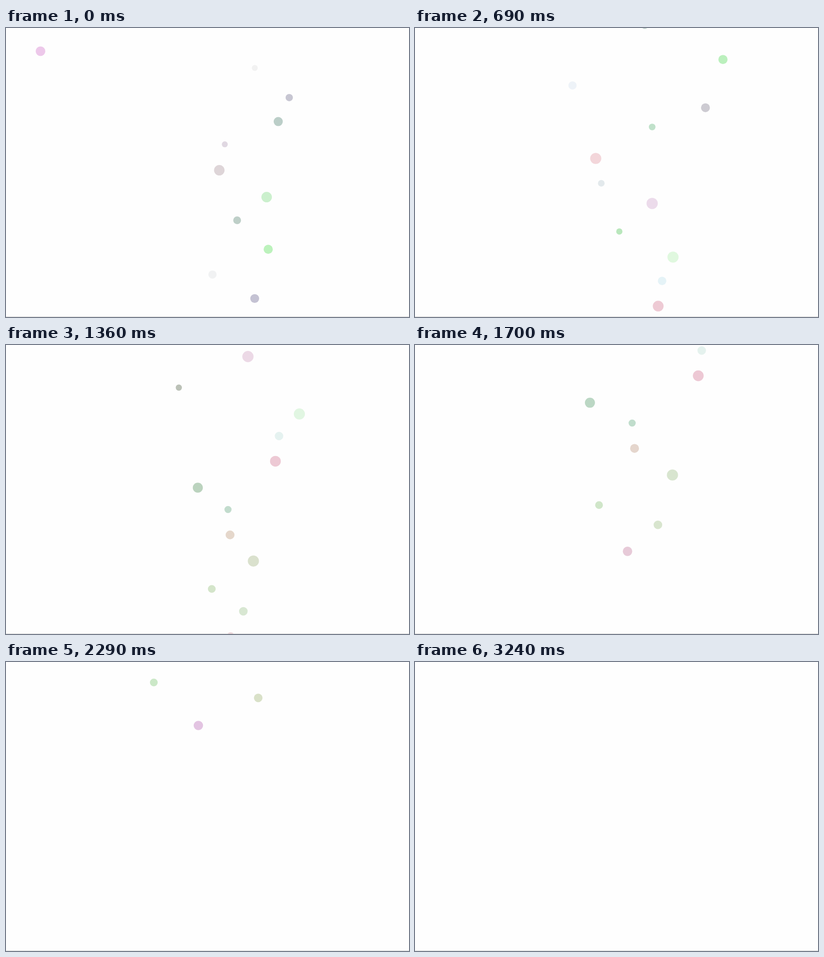
Recreate the animation shown at these times as an HTML page. Size 882 by 635 pixels, loop 3310 ms.

```html
<!DOCTYPE html>
<html lang="en">
<head>
<meta charset="utf-8">
<title>Rising bubbles</title>
<style>
html, body { margin: 0; width: 100%; height: 100%; overflow: hidden; background: #fefefe; }
svg { display: block; width: 882px; height: 635px; }
</style>
</head>
<body>
<svg viewBox="0 0 882 635">
  <g id="bubbles"></g>
  <rect y="634" width="882" height="1" fill="#d2d2d2"/>
</svg>
<script>
const LOOP = 3310;
const ORIGIN = { x: 508.2, y: 760 };
const FIRST = 673.2, GAP = 55.96;

// slope, radius, colour when low, colour when high
const specs = [
  [.054, 6.5, '#f2f2f2'],
  [.184, 8, '#c7c6d2'],
  [.158, 10, '#bfcec7', '#bacec8'],
  [-.0582, 6.5, '#d5d5d2', '#e6daea'],
  [-.0925, 11.5, '#dfd3db', '#ddd6d5'],
  [.1603, 11.5, '#caefca', '#cdf2d0'],
  [-.007, 8.5, '#c0cfc8', '#bacec8'],
  [.24, 10, '#bcf2bc', '#bbf0bd'],
  [-.258, 9, '#f2f2f2', '#eef3f9'],
  [.218, 9.7, '#c4c2d3', '#cfcdd2'],
  [.02, 7.3, '#b7eac1', '#c3decd'],
  [-.238, 12.2, '#f4dada', '#f3d3da'],
  [-.24, 7.3, '#e2e1ea', '#e3f1ee'],
  [.029, 12.3, '#ecdcee', '#ecd9e6'],
  [-.195, 6.8, '#b8f8be', '#bbbfb7'],
  [.22, 12.2, '#e0f8de', '#e1f6e3'],
  [.1595, 9.3, '#e5f3f8', '#e5f2ee'],
  [.1614, 11.8, '#eecad4', '#edc8d4'],
  [-.198, 11, '#bacdb5', '#bbd8c6'],
  [-.056, 7.8, '#c4dbcf', '#bfdecb'],
  [-.052, 9.7, '#e6d7c9', '#e4d6cf'],
  [.1165, 12.2, '#dbdecb', '#d6e9d2'],
  [-.2583, 8.5, '#d5e4cb', '#cbe8c7'],
  [.0643, 9.4, '#d8e7d2', '#d9e1c8'],
  [-.1405, 10.3, '#e9cdd3', '#e2c3e4']
];

// [time, step number] and [time, distance travelled]
const pace = [[0, 0], [300, 5], [350, 6], [570, 10], [620, 11], [760, 13], [1100, 18],
  [1150, 19], [1630, 26], [1770, 28], [2220, 35], [2290, 36], [2630, 41]];
const travel = [[0, 0], [300, 205.3], [690, 429], [1100, 643.7], [1700, 979.5],
  [2290, 1296.5], [2630, 1479]];

const lerp = (a, b, u) => a + (b - a) * u;

function along(keys, v, from = 0) {
  const to = 1 - from;
  const last = keys.length - 1;
  if (v >= keys[last][from]) return keys[last][to];
  const i = keys.findIndex(k => k[from] > v);
  const a = keys[i - 1], b = keys[i];
  return lerp(a[to], b[to], (v - a[from]) / (b[from] - a[from]));
}

const ticks = Array.from({ length: 42 }, (_, i) => Math.round(along(pace, i, 1) / 10) * 10);

const rgb = hex => [1, 3, 5].map(i => parseInt(hex.slice(i, i + 2), 16));

function mix(a, b, u) {
  const k = Math.min(1, Math.max(0, u));
  return `rgb(${a.map((c, i) => Math.round(lerp(c, b[i], k)))})`;
}

const layer = document.getElementById('bubbles');

function circle(r, fill) {
  const c = document.createElementNS('http://www.w3.org/2000/svg', 'circle');
  c.setAttribute('r', r);
  c.setAttribute('fill', fill);
  return layer.appendChild(c);
}

function place(c, x, y) {
  c.setAttribute('cx', x.toFixed(2));
  c.setAttribute('cy', y.toFixed(2));
}

const stray = circle(10.5, '#edc8ea');
const bubbles = specs.map(([slope, r, low, high = low], i) => ({
  el: circle(r, low),
  slope,
  low: rgb(low),
  high: rgb(high),
  start: FIRST - GAP * i,
  rise: 1 / Math.hypot(1, slope)
}));

function draw(ms) {
  const tick = ticks.filter(t => t <= ms).pop();
  const gone = along(travel, tick);
  place(stray, 75.5 - gone * .27, 51 - gone * .963);
  for (const b of bubbles) {
    const d = b.start + gone;
    const up = d * b.rise;
    b.el.style.display = d > 0 ? '' : 'none';
    place(b.el, ORIGIN.x + up * b.slope, ORIGIN.y - up);
    b.el.setAttribute('fill', mix(b.low, b.high, (d - 150) / 550));
  }
}

const begin = performance.now();
function frame() {
  draw((performance.now() - begin) % LOOP);
  requestAnimationFrame(frame);
}
frame();
</script>
</body>
</html>
```
